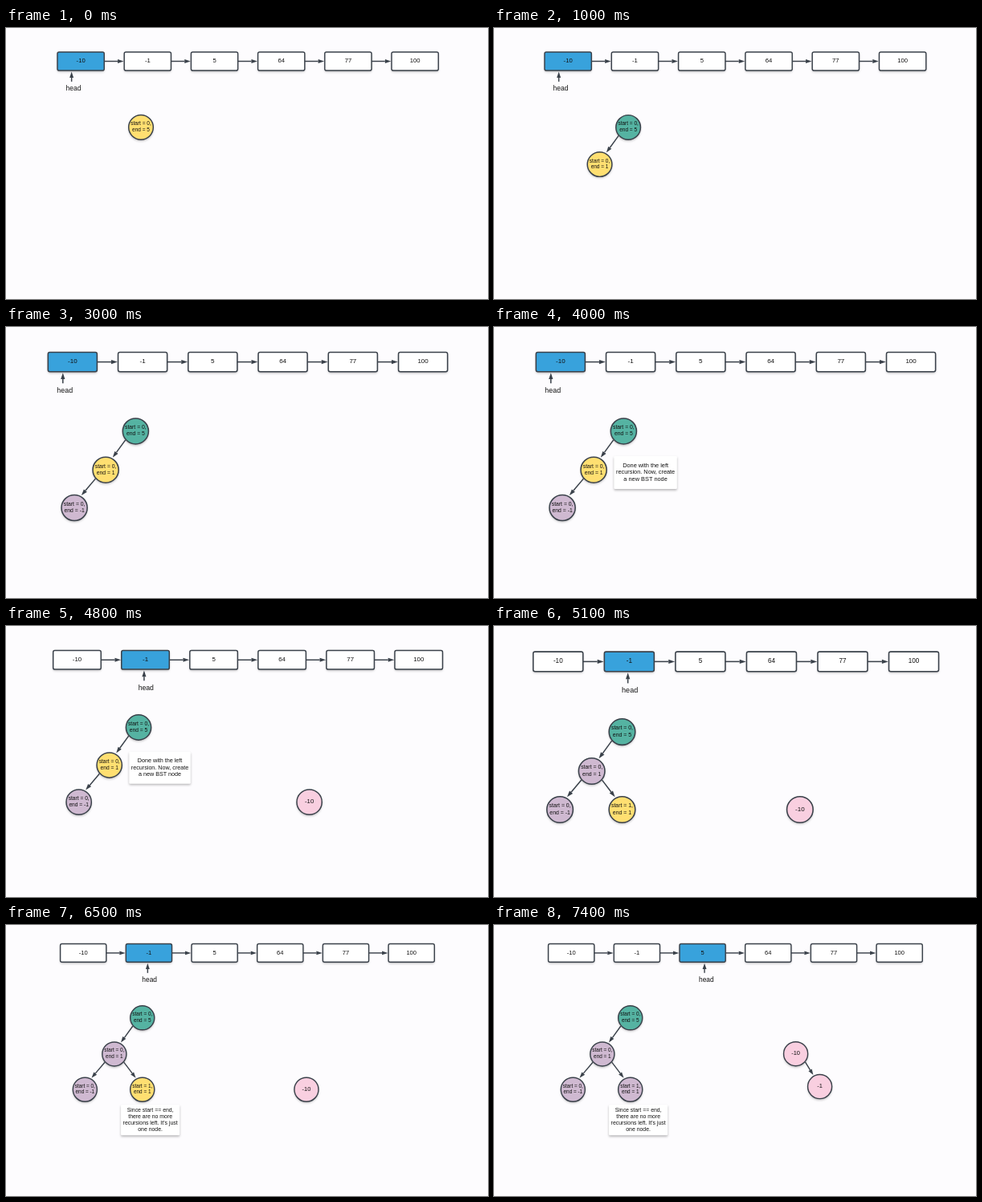
Animation, 600 px wide and 338 px high, one loop 8 s. Source, as an HTML page with a canvas:

```html
<!DOCTYPE html>
<html lang="en">
<head>
<meta charset="utf-8">
<title>Sorted list to balanced tree</title>
<style>
  html, body { margin: 0; width: 100%; height: 100%; overflow: hidden; background: #fdfcfe; }
  canvas { display: block; width: 100vw; height: 100vh; }
</style>
</head>
<body>
<canvas id="stage" width="600" height="338"></canvas>
<script>
const ctx = document.getElementById('stage').getContext('2d');
const LOOP = 8000;
const INK = '#3a414a';
const COLORS = { y: '#ffdf71', g: '#55b3a2', p: '#cfb9d1', pink: '#f9cfe0', blue: '#38a2dc' };

// World units: list boxes are 100 apart, origin at the left middle of the first box.
const BOX_W = 70, BOX_H = 27.7, RADIUS = 18.4;
const VALUES = ['-10', '-1', '5', '64', '77', '100'];
const HEAD_X = [21.2, 133.1, 238];

const CALLS = [
  { x: 125, y: 99, range: [0, 5] },
  { x: 82.3, y: 154.3, range: [0, 1], parent: 0 },
  { x: 37.6, y: 208.5, range: [0, -1], parent: 1 },
  { x: 125, y: 208.5, range: [1, 1], parent: 1 }
];

const BUILT = {
  none: [],
  single: [{ x: 375, y: 208.5, value: '-10' }],
  pair: [{ x: 377, y: 154, value: '-10' }, { x: 413.7, y: 204, value: '-1' }]
};

const NOTES = {
  invalid: { x: 34.8, y: 249.8, w: 69.5, h: 37.5,
    lines: ['Invalid case.', 'Simply return'] },
  create: { x: 156.2, y: 158, w: 90, h: 47,
    lines: ['Done with the left', 'recursion. Now, create', 'a new BST node'] },
  single: { x: 137.1, y: 254.9, w: 89.5, h: 46.6,
    lines: ['Since start == end,', 'there are no more', "recursions left. It's just", 'one node.'] }
};

// view: x, y, scale; calls: one color letter per visible call
const wide = [54, 43.3, 0.866], mid = [52.3, 43.6, 0.8725], low = [67.6, 34.9, 0.817];
const SCENES = [
  { at: 0, view: [64, 41.5, 0.832], calls: 'y' },
  { at: 900, view: [63, 41.5, 0.833], calls: 'gy' },
  { at: 1600, view: wide, calls: 'ggy' },
  { at: 1900, view: wide, calls: 'ggy', note: 'invalid' },
  { at: 2800, view: mid, calls: 'gyp' },
  { at: 3400, view: mid, calls: 'gyp', note: 'create' },
  { at: 4100, view: [58.7, 42.3, 0.8505], calls: 'gyp', note: 'create', head: 1, built: 'single' },
  { at: 5100, view: [48.8, 44.4, 0.8855], calls: 'gppy', head: 1, built: 'single' },
  { at: 6100, view: low, calls: 'gppy', note: 'single', head: 1, built: 'single' },
  { at: 7100, view: low, calls: 'gppp', note: 'single', head: 2, built: 'pair' }
];

function shadow(on) {
  ctx.shadowColor = on ? 'rgba(0,0,0,0.28)' : 'transparent';
  ctx.shadowBlur = 3;
  ctx.shadowOffsetY = 1.7;
}

function shape(path, fill, outlined = true) {
  shadow(true);
  ctx.fillStyle = fill;
  ctx.fill(path);
  shadow(false);
  if (outlined) ctx.stroke(path);
}

function text(lines, x, y, size) {
  ctx.font = `${size}px "Liberation Sans", Arial, sans-serif`;
  ctx.fillStyle = '#111';
  lines.forEach((line, i) =>
    ctx.fillText(line, x, y + (i - (lines.length - 1) / 2) * size * 1.2));
}

function rect(x, y, w, h, r) {
  const path = new Path2D();
  path.roundRect(x, y, w, h, r);
  return path;
}

function arrow(x1, y1, x2, y2) {
  const length = Math.hypot(x2 - x1, y2 - y1), tip = 9;
  ctx.save();
  ctx.translate(x1, y1);
  ctx.rotate(Math.atan2(y2 - y1, x2 - x1));
  ctx.beginPath();
  ctx.moveTo(0, 0);
  ctx.lineTo(length - tip, 0);
  ctx.stroke();
  ctx.fillStyle = INK;
  ctx.beginPath();
  ctx.moveTo(length, 0);
  ctx.lineTo(length - tip, -3);
  ctx.lineTo(length - tip, 3);
  ctx.fill();
  ctx.restore();
}

function branch(from, to) {
  const side = Math.sign(to.x - from.x);
  arrow(from.x + side * 14.5, from.y + 12.5, to.x - side * 10, to.y - 17.7);
}

function node({ x, y }, fill, lines, size) {
  const path = new Path2D();
  path.arc(x, y, RADIUS, 0, 2 * Math.PI);
  shape(path, fill);
  text(lines, x, y - 0.5, size);
}

function drawList(head) {
  VALUES.forEach((value, i) => {
    const x = i * 100;
    shape(rect(x, -BOX_H / 2, BOX_W, BOX_H, 2.5), i === head ? COLORS.blue : '#fff');
    text([value], x + BOX_W / 2, -0.4, 9.2);
    if (i) arrow(x - 30, 0, x - 0.8, 0);
  });
  arrow(HEAD_X[head], 30.5, HEAD_X[head], 15.6);
  text(['head'], HEAD_X[head] + 2.8, 41, 10.2);
}

function draw(time) {
  const { view: [x, y, scale], calls, note, head = 0, built = 'none' } =
    SCENES.findLast(scene => scene.at <= time);
  ctx.setTransform(1, 0, 0, 1, 0, 0);
  ctx.fillStyle = '#fdfcfe';
  ctx.fillRect(0, 0, 600, 338);
  ctx.setTransform(scale, 0, 0, scale, x, y);
  ctx.textAlign = 'center';
  ctx.textBaseline = 'middle';
  ctx.strokeStyle = INK;
  ctx.lineWidth = 1.75;

  drawList(head);

  [...calls].forEach((color, i) => {
    const call = CALLS[i], [start, end] = call.range;
    node(call, COLORS[color], [`start = ${start},`, `end = ${end}`], 7.8);
    if (i) branch(CALLS[call.parent], call);
  });

  BUILT[built].forEach((item, i, all) => {
    node(item, COLORS.pink, [item.value], 9.1);
    if (i) branch(all[i - 1], item);
  });

  if (note) {
    const { x, y, w, h, lines } = NOTES[note];
    shape(rect(x - w / 2, y - h / 2, w, h, 1.5), '#fff', false);
    text(lines, x, y, 8.45);
  }
}

function tick() {
  draw(performance.now() % LOOP);
  requestAnimationFrame(tick);
}
tick();
</script>
</body>
</html>
```
